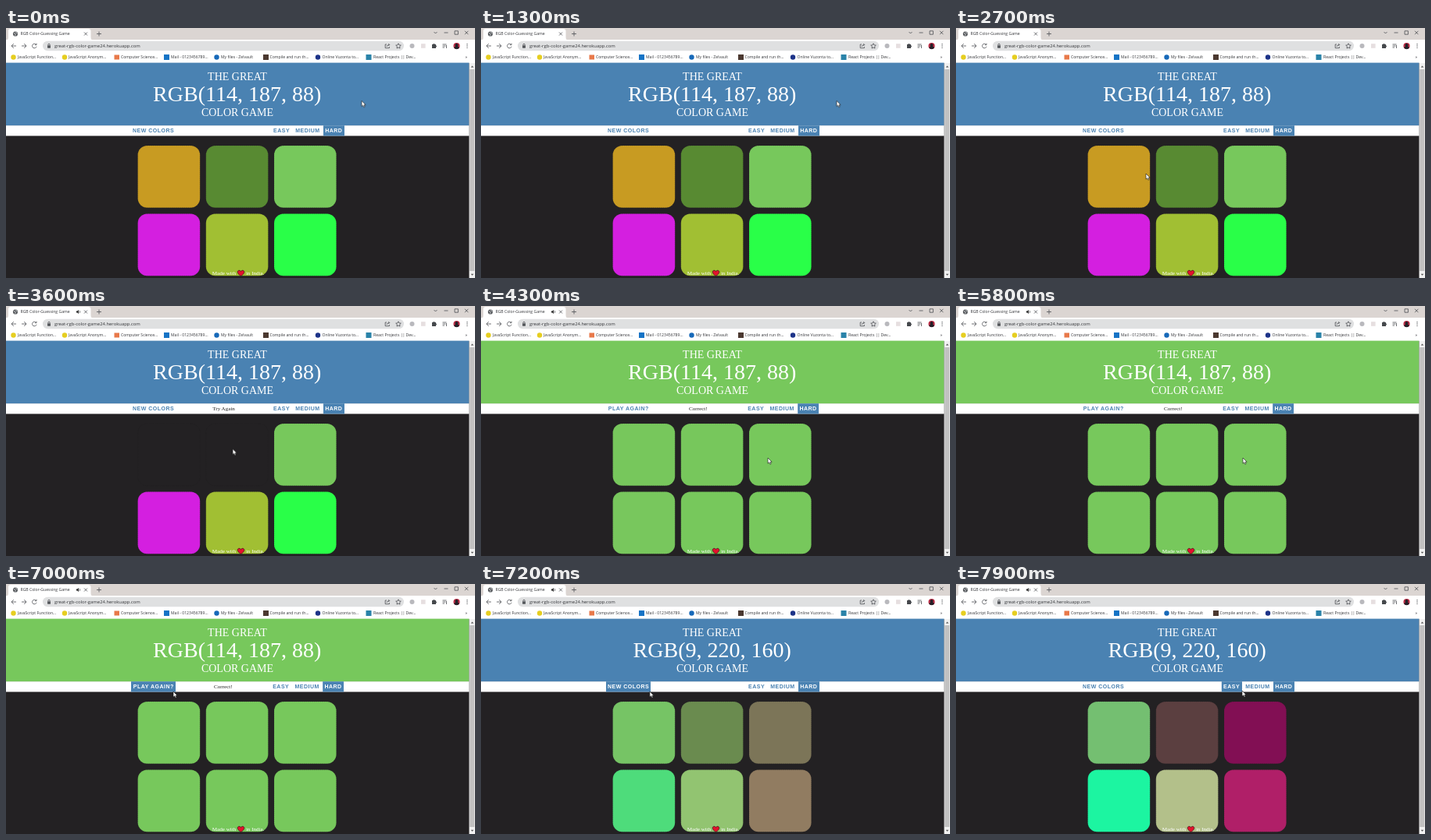
An HTML page that plays this animation: 600x321 px, repeating every 8 s.

```html
<!DOCTYPE html>
<html lang="en">
<head>
<meta charset="utf-8">
<title>RGB Color-Guessing Game</title>
<style>
  html, body { margin: 0; width: 100%; height: 100%; overflow: hidden; background: #232123; }
  svg { display: block; width: 100vw; height: 100vh; }
  :root { --page: #232123; --blue: #4a82b2; --clear: #4a82b200; --win: #77c85c; }

  .ui { font-family: "Open Sans", "Noto Sans", sans-serif; font-size: 5.1px; fill: #35363a; }
  .url { font-size: 5.9px; }
  .line { fill: none; stroke: #4c4f53; stroke-width: .8; }
  .serif { font-family: "Liberation Serif", serif; font-size: 7.1px; }
  .title { fill: #fff; font-size: 14px; text-anchor: middle; }
  .big { font-size: 28px; }
  .nav { font: bold 7px "Liberation Sans", sans-serif; letter-spacing: .5px; fill: var(--blue); }
  .on { fill: #fff; }
  .tint { fill: currentColor; }

  /* One loop: wrong pick, wrong pick, right pick, new round */
  .header, .tile, .cursor, .sound, .first, .won, .second, .again, .reset,
  .shift, .hover, .easy { animation: 8s infinite; }
  .header, .sound, .first, .won, .second, .again, .reset, .shift { animation-timing-function: step-end; }

  .header { animation-name: header; }
  .tile { fill: var(--a); animation-name: tile; stroke: var(--page); stroke-opacity: .35; stroke-width: .7; stroke-dasharray: 1.3 1.3; }
  .miss1 { animation-name: miss1; }
  .miss2 { animation-name: miss2; }
  .cursor { animation-name: cursor; animation-timing-function: ease-in-out; }
  .sound { animation-name: sound; }
  .first { animation-name: first; }
  .won { animation-name: won; }
  .second { animation-name: second; }
  .again { animation-name: again; }
  .reset { animation-name: reset; }
  .hover { animation-name: hover; }
  .easy { animation-name: easy; }
  .shift { animation-name: shift; }

  /* Tiles fade for 0.6 s, buttons for 0.3 s; everything else switches at once */
  @keyframes header { 0% { fill: var(--blue); } 47% { fill: var(--win); } 88%, 100% { fill: var(--blue); } }
  @keyframes tile {
    0%, 47% { fill: var(--a); }
    54.5%, 88% { fill: var(--win); }
    95.5%, 100% { fill: var(--b); }
  }
  @keyframes miss1 {
    0%, 34.5% { fill: var(--a); }
    42%, 47% { fill: var(--page); }
    54.5%, 88% { fill: var(--win); }
    95.5%, 100% { fill: var(--b); }
  }
  @keyframes miss2 {
    0%, 38% { fill: var(--a); }
    45.5%, 47% { fill: var(--page); }
    54.5%, 88% { fill: var(--win); }
    95.5%, 100% { fill: var(--b); }
  }
  @keyframes cursor {
    0%, 28.75% { transform: translate(455px, 93.5px); }
    33.75%, 34.75% { transform: translate(243px, 187px); }
    37.75%, 45% { transform: translate(290px, 183.5px); }
    47%, 77.5% { transform: translate(367px, 195px); }
    84.5%, 89.5% { transform: translate(214px, 138px); }
    96%, 100% { transform: translate(366px, 137px); }
  }
  @keyframes hover {
    0%, 82.5% { fill: var(--clear); color: #4a82b2; }
    86.25%, 90.25% { fill: var(--blue); color: #fff; }
    94%, 100% { fill: var(--clear); color: #4a82b2; }
  }
  @keyframes easy {
    0%, 94.25% { fill: var(--clear); color: #4a82b2; }
    98%, 100% { fill: var(--blue); color: #fff; }
  }
  @keyframes sound { 0% { opacity: 0; } 36%, 100% { opacity: 1; } }
  @keyframes first { 0% { opacity: 1; } 88%, 100% { opacity: 0; } }
  @keyframes second { 0% { opacity: 0; } 88%, 100% { opacity: 1; } }
  @keyframes again { 0% { opacity: 0; } 34.5% { opacity: 1; } 47%, 100% { opacity: 0; } }
  @keyframes won { 0% { opacity: 0; } 47% { opacity: 1; } 88%, 100% { opacity: 0; } }
  @keyframes reset { 0% { opacity: 1; } 47% { opacity: 0; } 88%, 100% { opacity: 1; } }
  @keyframes shift { 0% { transform: none; } 47% { transform: translateX(-.8px); } 88%, 100% { transform: none; } }
</style>
</head>
<body>
<svg viewBox="0 0 600 321" preserveAspectRatio="none">
  <!-- Browser window -->
  <rect width="600" height="16" fill="#dbd5d2"/>
  <path d="M0 15.5Q3 15.5 3 12V4Q3 1 6 1H105Q108.500 1 108.500 4V12Q108.500 15.500 112 15.500Z" fill="#fff"/>
  <rect y="15" width="600" height="30" fill="#fff"/>
  <circle cx="12" cy="7.500" r="3.100" fill="#55585c"/>
  <path d="M9.800 6.500l2 .8 .5 1.500-1 1M12.500 5l.8 1.400 1.300.8" fill="none" stroke="#fff" stroke-width=".7"/>
  <text class="ui" x="18.500" y="9.300">RGB Color-Guessing Game</text>
  <g class="sound">
    <path d="M89.800 6.500h1.400l1.800-1.600v5.200l-1.800-1.600h-1.400z" fill="#333"/>
    <path class="line" d="M94 6q1.300 1.500 0 3"/>
  </g>
  <path class="line" d="M100 5.500l4 4m0-4l-4 4M116 7.500h6m-3-3v6"/>
  <path class="line" d="M547.500 5l2 2 2-2M560.500 6h5M574 3.800h4.400v4.400h-4.400zM587 3.800l4.400 4.400m0-4.400l-4.400 4.400"/>

  <path class="line" d="M13 23H7m2.800-2.800L7 23l2.800 2.800"/>
  <path class="line" d="M20 23h6m-2.800-2.800L26 23l-2.800 2.800"/>
  <path class="line" d="M38.500 21.300a2.800 2.800 0 1 0 .5 2.500M39 19.700v2h-2"/>
  <rect x="47" y="16.800" width="462" height="12.400" rx="6.200" fill="#dfe0e1"/>
  <rect x="53" y="22.300" width="4" height="3.400" rx=".4" fill="#55585c"/>
  <path class="line" d="M53.800 22.500v-1a1.200 1.200 0 0 1 2.400 0v1"/>
  <text class="ui url" x="62" y="25.100">great-rgb-color-game24.herokuapp.com</text>
  <path class="line" d="M487 21h-1.800v4.700h5.200V24M487 24q.5-2.500 3.500-2.500m-1.300-1.500l1.500 1.500-1.500 1.500"/>
  <path class="line" d="M502 19.800l1 2.100 2.300.3-1.700 1.600.4 2.300-2-1.100-2 1.100.4-2.300-1.700-1.600 2.300-.3z"/>
  <circle cx="519.500" cy="23" r="3" fill="#b9b9bd"/>
  <rect x="531" y="20.200" width="5.600" height="5.600" fill="#e6dfe0"/>
  <path d="M545 21h1.500a1 1 0 0 1 2 0h1.500v1.500a1 1 0 0 1 0 2V26h-5z" fill="#45484c"/>
  <path class="line" d="M558.500 21h5m-5 2h4m-4 2h2.500M563.500 22v4"/>
  <circle cx="576.500" cy="23" r="4.100" fill="#bd2c45"/>
  <path d="M573.200 25.600q.3-2 1.900-2.200a2 2 0 1 1 2.800 0q1.600.3 1.900 2.200a4.100 4.100 0 0 1-6.600 0" fill="#242028"/>
  <g fill="#4c4f53"><circle cx="590" cy="20.700" r=".65"/><circle cx="590" cy="23" r=".65"/><circle cx="590" cy="25.300" r=".65"/></g>

  <circle cx="9.500" cy="37.500" r="3.200" fill="#e6ce20"/>
  <circle cx="75" cy="37.500" r="3.200" fill="#e6ce20"/>
  <rect x="138.500" y="34.500" width="6.500" height="6" fill="#e8794a"/>
  <rect x="202" y="34" width="7" height="7" fill="#1674c6"/>
  <circle cx="269.500" cy="37.500" r="3.200" fill="#1769b9"/>
  <rect x="329" y="34" width="7" height="7" fill="#4b3930"/>
  <circle cx="399" cy="37.500" r="3.200" fill="#1d3388"/>
  <rect x="460.500" y="34" width="7" height="7" fill="#2a83a9"/>
  <g class="ui">
    <text x="15" y="39.300">JavaScript Function...</text>
    <text x="80" y="39.300">JavaScript Anonym...</text>
    <text x="147" y="39.300">Computer Science...</text>
    <text x="211" y="39.300">Mail - 0123456789...</text>
    <text x="275" y="39.300">My files - Zelvault</text>
    <text x="337.500" y="39.300">Compile and run th...</text>
    <text x="404.500" y="39.300">Online Vuzonta to...</text>
    <text x="470" y="39.300">React Projects || Dev...</text>
    <text x="587.500" y="39.300">»</text>
  </g>

  <!-- Page -->
  <rect y="45" width="592.500" height="276" fill="#232123"/>
  <rect class="header" y="44.600" width="592.500" height="81"/>
  <g class="serif title">
    <text x="296" y="66.600">THE GREAT</text>
    <text class="big first" x="295.700" y="94">RGB(114, 187, 88)</text>
    <text class="big second" x="295.700" y="94">RGB(9, 220, 160)</text>
    <text x="296" y="113.300">COLOR GAME</text>
  </g>

  <rect y="125.200" width="592.500" height="13.300" fill="#fff"/>
  <g class="hover">
    <rect x="160" y="125.200" width="57" height="13.300"/>
    <g class="nav tint">
      <text class="reset tint" x="162" y="134">NEW COLORS</text>
      <text class="won tint" x="162.800" y="134">PLAY AGAIN?</text>
    </g>
  </g>
  <g class="serif" fill="#232323">
    <text class="again" x="264.200" y="134.200">Try Again</text>
    <text class="won" x="266" y="134.200">Correct!</text>
  </g>
  <g class="nav shift">
    <g class="easy">
      <rect x="339.800" y="125.200" width="26.200" height="13.300"/>
      <text class="tint" x="342" y="134">EASY</text>
    </g>
    <text x="370.200" y="134">MEDIUM</text>
    <rect x="406" y="125.200" width="27" height="13.300"/>
    <text class="on" x="408.200" y="134">HARD</text>
  </g>

  <g id="tiles"></g>

  <g class="serif" fill="#fff">
    <text x="263.800" y="317.300">Made with</text>
    <text x="306.900" y="317.300">in India.</text>
  </g>
  <path d="M300.500 318.500C297.500 316.300 296.200 315 296.200 313.200C296.200 310.900 299.500 310.600 300.500 312.500C301.500 310.600 304.800 310.900 304.800 313.200C304.800 315 303.500 316.300 300.500 318.500Z" fill="#e3122c" stroke="#35101a" stroke-width=".7"/>

  <!-- Scrollbar -->
  <rect x="592.500" y="45" width="7.500" height="276" fill="#f1f1f1"/>
  <rect x="593.200" y="53" width="6.100" height="259" fill="#c1c1c1"/>
  <path d="M594.700 50.500l1.800-2 1.800 2zM594.700 315.800l1.800 2 1.800-2z" fill="#505050"/>

  <path class="cursor" d="M0 0V7.200L1.700 5.700L2.800 8.200L4.100 7.600L3 5.200H5.200Z" fill="#fff" stroke="#111" stroke-width=".6"/>
</svg>
<script>
  const tiles = [
    ['#c89b22', '#74bf71', 'miss1'], ['#588a32', '#5b3f40', 'miss2'], ['#77c85c', '#820f54', ''],
    ['#d41fe0', '#1cf5a1', ''], ['#a1bf33', '#b3c08a', ''], ['#29ff48', '#b01f68', '']
  ];
  document.getElementById('tiles').innerHTML = tiles.map(([before, after, miss], i) => {
    const x = 168.6 + i % 3 * 87.2, y = 151.1 + Math.floor(i / 3) * 87.5;
    return `<rect class="tile ${miss}" x="${x}" y="${y}" width="79.6" height="79.6" rx="12" style="--a:${before};--b:${after}"/>`;
  }).join('');
</script>
</body>
</html>
```
